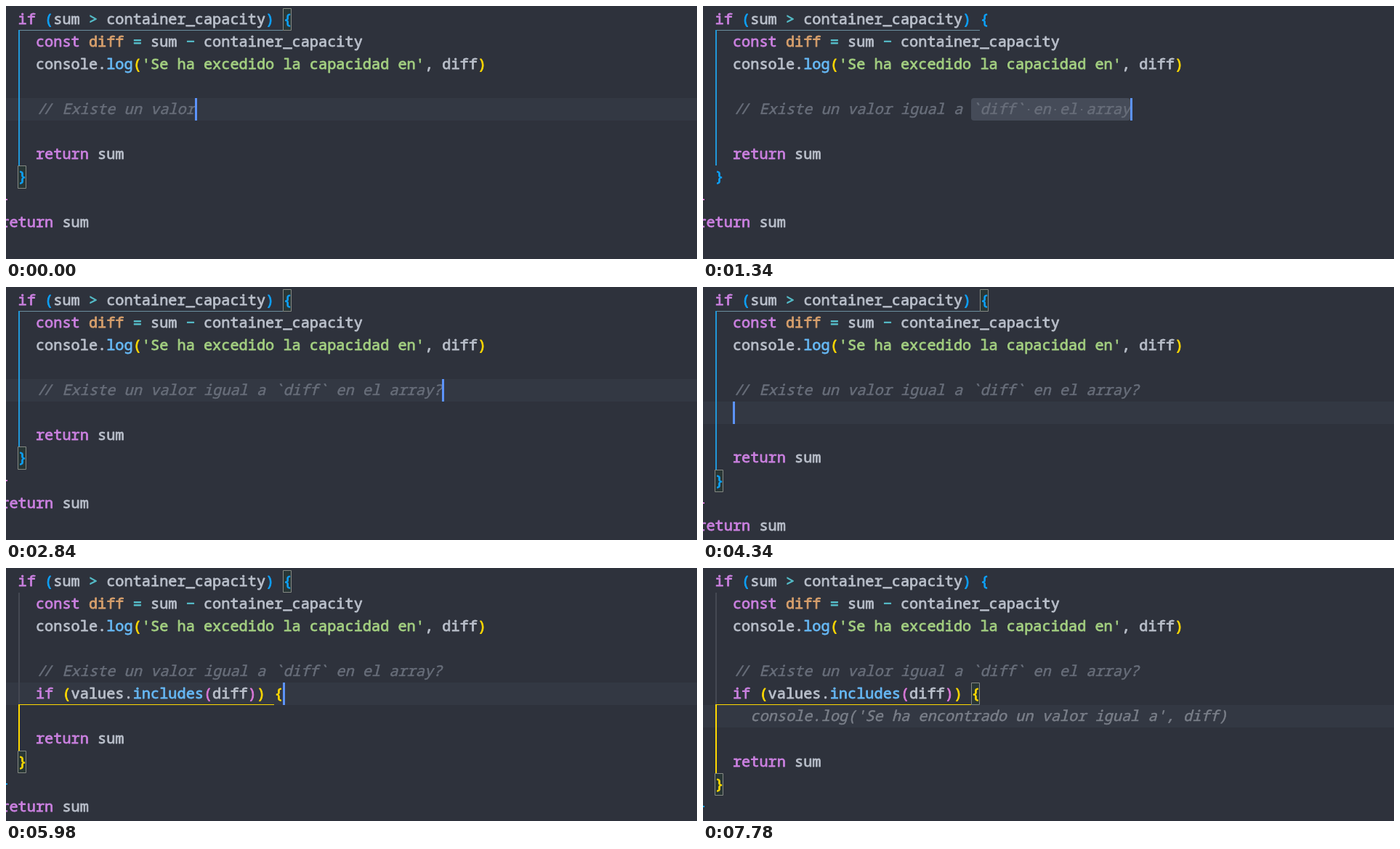
An HTML page with a canvas for the animation above (8 s loop, 951 by 349 pixels).

```html
<!DOCTYPE html>
<html lang="es">
<head>
<meta charset="utf-8">
<title>Editor de código</title>
<style>
html, body { margin: 0; width: 100%; height: 100%; overflow: hidden; background: #2e323c; }
canvas { display: block; }
</style>
</head>
<body>
<canvas id="stage" width="951" height="349"></canvas>
<script>
const W = 951, H = 349, LOOP = 8000;
const CHAR = 12.16, LEFT = 16.6;
const FONT = '500 20.27px "Noto Sans Mono", "DejaVu Sans Mono", monospace';
const C = {
  bg: '#2e323c', line: '#333843', select: '#454b58', cursor: '#5c93fb',
  text: '#b9bfca', keyword: '#cb80e0', name: '#d8a06c', op: '#56bfcb',
  string: '#a3cf80', call: '#66b8f5', comment: '#686e7a', ghost: '#7a7f89',
  blue: '#0da2fb', gold: '#ffd900', pink: '#da78d8',
  guide: '#2197d8', rule: '#6b8f9f', dim: '#444852', box: '#858983'
};
const ctx = document.getElementById('stage').getContext('2d');

const colX = col => LEFT + col * CHAR;
const rowY = row => Math.floor(3 + row * 31.14);

function rect(x, y, w, h, color) {
  ctx.fillStyle = color;
  ctx.fillRect(x, y, w, h);
}

// A thin outline gives the semi-bold weight.
function write(row, col, text, color, italic) {
  const x = colX(col), y = rowY(row) + 22;
  ctx.font = (italic ? 'italic ' : '') + FONT;
  ctx.fillStyle = ctx.strokeStyle = color;
  ctx.lineWidth = italic ? 0.5 : 0.8;
  ctx.lineJoin = 'round';
  ctx.fillText(text, x, y);
  ctx.strokeText(text, x, y);
}

// Parts alternate between text and colour name.
function code(row, col, ...parts) {
  for (let i = 0; i < parts.length; i += 2) {
    write(row, col, parts[i], C[parts[i + 1]]);
    col += parts[i].length;
  }
}

function comment(row, text) {
  write(row, 2.15, '/', C.comment, true);
  write(row, 2.85, '/', C.comment, true);
  write(row, 5, text, C.comment, true);
}

function bracketBox(row, col) {
  const x = Math.floor(colX(col)), y = rowY(row), h = rowY(row + 1) - y;
  rect(x, y, 12, h, 'rgba(0, 100, 0, 0.1)');
  ctx.strokeStyle = C.box;
  ctx.lineWidth = 1;
  ctx.strokeRect(x + 0.5, y + 0.5, 11, h - 1);
}

function selection(row, from, to) {
  const x = Math.round(colX(from)), y = rowY(row);
  ctx.fillStyle = C.select;
  ctx.beginPath();
  ctx.roundRect(x, y, Math.round(colX(to)) - x, 31, 4);
  ctx.fill();
}

function spaceDots(row, col, text) {
  [...text].forEach((ch, i) => {
    if (ch === ' ') rect(colX(col + i) + 5, rowY(row) + 15, 2, 2, '#656b77');
  });
}

// Each step: start time, comment typed so far.
const TYPED = [
  [0, 'Existe un valor'],
  [300, 'Existe un valor igual'],
  [600, 'Existe un valor igual a'],
  [1050, 'Existe un valor igual a '],
  [1340, 'Existe un valor igual a `diff` en el array'],
  [2840, 'Existe un valor igual a `diff` en el array?']
];
const CURSOR_OFF = [[1790, 2390], [3290, 3740], [4790, 5390], [5830, 5980], [6580, 7030], [7630, 8000]];

function draw(t) {
  const note = TYPED.filter(s => s[0] <= t).pop()[1];
  const selected = t >= 1340 && t < 2840;
  const accepted = t >= 5980;
  const extra = (t >= 4340) + (t >= 7180);
  const row = 4 + extra;
  const close = 7 + extra;
  const col = t < 4340 ? 5 + note.length : !accepted ? 2 : t < 7180 ? 30 : 4;

  rect(0, 0, W, H, C.bg);
  if (selected) selection(4, 29, 47);
  else rect(0, rowY(row), W, 31, C.line);

  if (accepted) {
    rect(17, 34, 2, 154, C.dim);
    rect(17, 188, 352, 1, C.gold);
    rect(17, 188, 2, rowY(close) - 188, C.gold);
  } else {
    rect(17, 33, 364, 1, C.rule);
    rect(17, 33, 2, rowY(close) - 33, C.guide);
  }
  if (!selected) {
    if (t < 6130) bracketBox(0, 30);
    else bracketBox(5, 29);
    bracketBox(close, 0);
  }

  code(0, 0, 'if', 'keyword', ' ', 'text', '(', 'blue', 'sum ', 'text', '>', 'op',
    ' container_capacity', 'text', ')', 'blue', ' ', 'text', '{', 'blue');
  code(1, 2, 'const ', 'keyword', 'diff ', 'name', '=', 'op', ' sum ', 'text', '−', 'op',
    ' container_capacity', 'text');
  code(2, 2, 'console.', 'text', 'log', 'call', '(', 'gold',
    "'Se ha excedido la capacidad en'", 'string', ', diff', 'text', ')', 'gold');

  comment(4, note);
  if (selected) spaceDots(4, 29, '`diff` en el array');

  if (accepted) {
    code(5, 2, 'if', 'keyword', ' ', 'text', '(', 'gold', 'values.', 'text', 'includes', 'call',
      '(', 'pink', 'diff', 'text', ')', 'pink', ')', 'gold', ' ', 'text', '{', 'gold');
  } else if (t >= 4490) {
    write(5, 2, 'if (values.includes(diff)) {', C.ghost, true);
  }
  if (t >= 7780) {
    write(6, 4, "console.log('Se ha encontrado un valor igual a', diff)", C.ghost, true);
  }

  code(6 + extra, 2, 'return', 'keyword', ' sum', 'text');
  code(close, 0, '}', accepted ? 'gold' : 'blue');
  // Only the tip of the outer brace reaches the stage.
  rect(0, rowY(close + 1) + 14, 2, 2, accepted ? C.blue : C.pink);
  code(close + 2, -2, 'return', 'keyword', ' sum', 'text');

  if (!CURSOR_OFF.some(([from, to]) => t >= from && t < to)) {
    rect(Math.round(colX(col)), rowY(row), 3, 31, C.cursor);
  }
}

const start = performance.now();
function frame() {
  draw((performance.now() - start) % LOOP);
  requestAnimationFrame(frame);
}
frame();
</script>
</body>
</html>
```
